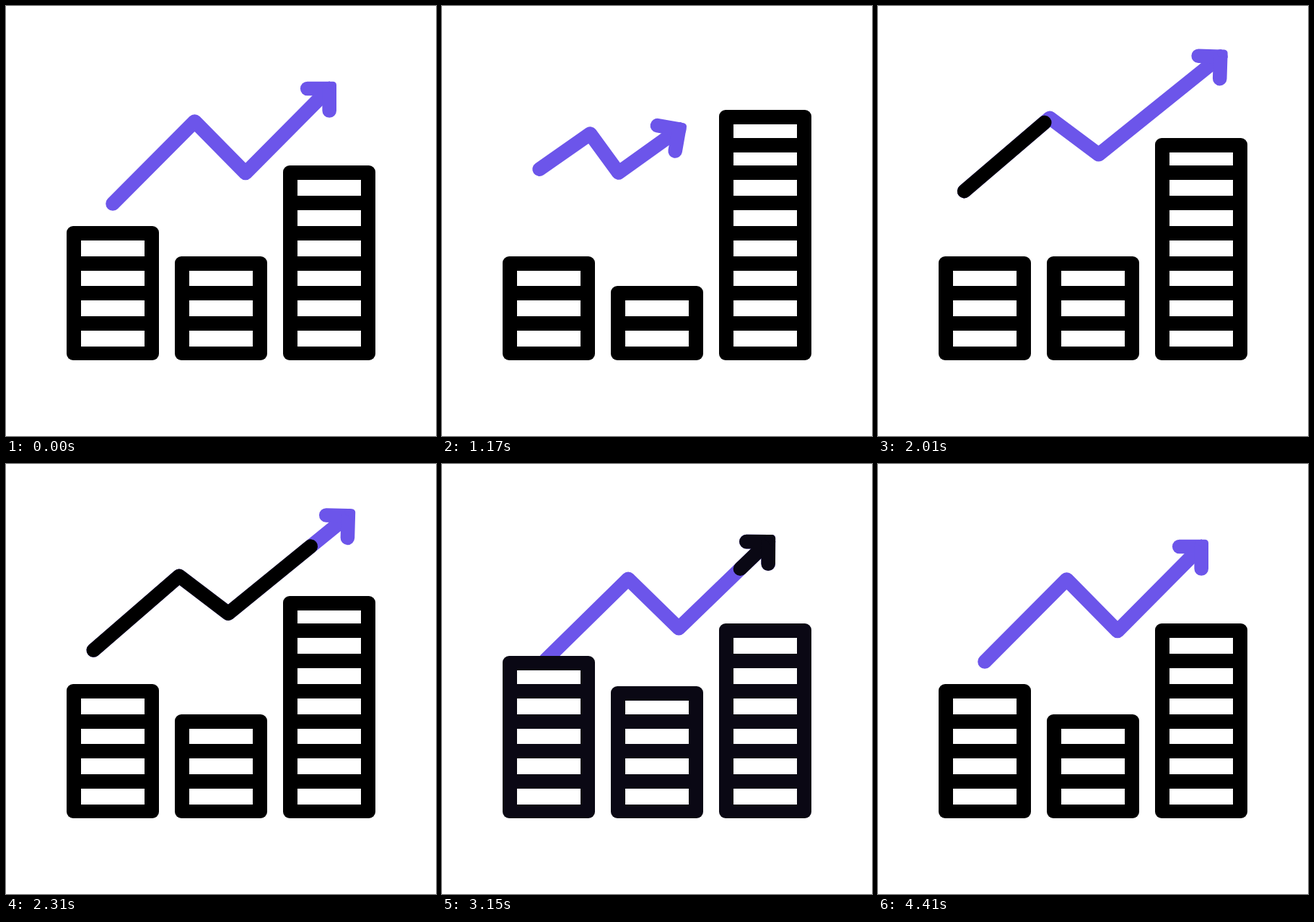
Recreate the animation shown at these times as an HTML page with a canvas. Size 596 by 596 pixels, loop 4.53 s.

```html
<!DOCTYPE html>
<html lang="en">
<head>
<meta charset="utf-8">
<title>Growth chart</title>
<style>
  html, body { margin: 0; width: 100%; height: 100%; overflow: hidden; background: #fff; }
  canvas { display: block; width: 100vw; height: 100vh; }
</style>
</head>
<body>
<canvas id="stage" width="596" height="596"></canvas>
<script>
const ctx = document.getElementById('stage').getContext('2d');
const LOOP = 4530, TICK = 30;
const PURPLE = '#6c55ea', BLACK = '#000', INK = '#0a0814';
const LINE = 19.6, BARB = 30.5;
const BAR_WIDTH = 128, BAND = 20, BOTTOM = 491;

// Arrow poses: start, peak, dip and tip of the line, tilt of the head in radians
const REST = { line: [[148, 274], [261.5, 160], [332, 231.5], [448.2, 114.5]], tilt: 0 };
const LOW = { line: [[136, 225], [204, 178], [242, 232], [322, 175]], tilt: 0.18 };
const HIGH = { line: [[119.5, 257], [238.5, 155], [306.5, 205.5], [476, 69]], tilt: 0.03 };
const MOVES = [
  { from: REST, to: LOW, start: 360, end: 1040, stretch: 0 },
  { from: LOW, to: HIGH, start: 1040, end: 2080, stretch: 0.04 },
  { from: HIGH, to: REST, start: 2080, end: 3510, stretch: 0 }
];

// Rows at rest, and the times at which a row is added or taken away
const BARS = [
  { x: 84, home: 4, added: [1800, 2160, 2700], removed: [690, 1410, 3810] },
  { x: 234, home: 3, added: [1980, 2640, 3330], removed: [750, 3960, 3960] },
  { x: 384, home: 6, added: [600, 960], removed: [1410, 2460] }
];
const HOP = { start: 3930, end: 4410, rise: 18, grow: 1.07 };

const clamp = v => Math.min(1, Math.max(0, v));
const span = (t, a, b) => clamp((t - a) / (b - a));
const ease = p => 0.5 - 0.5 * Math.cos(Math.PI * p);
const mix = (a, b, p) => a + (b - a) * p;
const distance = (a, b) => Math.hypot(b[0] - a[0], b[1] - a[1]);

function arrowPose(t) {
  const { from, to, start, end, stretch } = MOVES.find(m => t < m.end) || MOVES[2];
  const p = ease(span(t, start, end));
  const widen = stretch * Math.sin(Math.PI * p);
  const line = from.line.map(([x, y], i) => {
    const px = mix(x, to.line[i][0], p);
    return [px + widen * (px - 200), mix(y, to.line[i][1], p)];
  });
  return { line, tilt: mix(from.tilt, to.tilt, p) };
}

function stroke(points, width, color, from = 0, to = Infinity) {
  if (to <= from) return;
  ctx.beginPath();
  points.forEach(p => ctx.lineTo(...p));
  ctx.setLineDash(to < Infinity ? [to - from, 9999] : []);
  ctx.lineDashOffset = -from;
  ctx.lineWidth = width;
  ctx.strokeStyle = color;
  ctx.stroke();
  ctx.setLineDash([]);
}

function drawHead(tip, tilt, color, from = 0, to = BARB) {
  ctx.save();
  ctx.translate(...tip);
  ctx.rotate(tilt);
  stroke([[0, 0], [-BARB, 0]], LINE, color, from, to);
  stroke([[0, 0], [0, BARB]], LINE, color, from, to);
  // Squarer outer corner
  if (from === 0) stroke([[0, -5], [5, -5], [5, 0]], LINE - 10, color);
  ctx.restore();
}

// A black run travels along the purple line: its front first, then its end
function drawArrow(t, ink) {
  const { line, tilt } = arrowPose(t);
  const tip = line[3];
  stroke(line, LINE, PURPLE);
  drawHead(tip, tilt, PURPLE);

  const length = line.slice(1).reduce((sum, p, i) => sum + distance(line[i], p), 0);
  const to = span(t, 1830, 2430) * (length + BARB);
  const from = span(t, 2660, 3260) * (length + BARB);
  if (to <= from) return;
  stroke(line, LINE, ink, Math.min(from, length), Math.min(to, length));
  if (to > length) drawHead(tip, tilt, ink, Math.max(0, from - length), to - length);
}

// Rows beyond the resting height sit a little closer together
const bandTop = (row, home) =>
  Math.round(472 - 41.8 * Math.min(row, home) - 38.5 * Math.max(0, row - home));

function drawStack({ x, home }, first, last, ink) {
  const top = bandTop(last, home);
  const bottom = first ? bandTop(first, home) + BAND : BOTTOM;
  ctx.fillStyle = ink;
  ctx.beginPath();
  ctx.roundRect(x, top, BAR_WIDTH, bottom - top, 9);
  ctx.fill();
  ctx.fillStyle = '#fff';
  for (let row = first + 1; row <= last; row++) {
    const y = bandTop(row, home) + BAND;
    ctx.fillRect(x + BAND, y, BAR_WIDTH - 2 * BAND, bandTop(row - 1, home) - y);
  }
}

// The two upper rows of the middle stack hop up and vanish
function drawHop(t, bar, ink) {
  const p = span(t, HOP.start, HOP.end);
  if (p === 0 || p === 1) return;
  const rise = ease(span(p, 0, 0.35));
  const scale = mix(1, HOP.grow, rise) * (1 - ease(span(p, 0.35, 1)));
  const first = bar.home, last = first + 2;
  const cx = bar.x + BAR_WIDTH / 2;
  const cy = (bandTop(first, bar.home) + bandTop(last, bar.home) + BAND) / 2;
  ctx.save();
  ctx.translate(cx, cy - HOP.rise * rise);
  ctx.scale(scale, scale);
  ctx.translate(-cx, -cy);
  drawStack(bar, first, last, ink);
  ctx.restore();
}

function draw(t) {
  const ink = t >= 3060 && t < 3300 ? INK : BLACK;
  const past = times => times.filter(time => time <= t).length;
  ctx.fillStyle = '#fff';
  ctx.fillRect(0, 0, 596, 596);
  ctx.lineCap = ctx.lineJoin = 'round';
  drawArrow(t, ink);
  for (const bar of BARS) {
    drawStack(bar, 0, bar.home + past(bar.added) - past(bar.removed), ink);
  }
  if (t >= BARS[1].removed[1]) drawHop(t, BARS[1], ink);
}

const origin = performance.now();
function tick() {
  const t = (performance.now() - origin) % LOOP;
  draw(Math.floor(t / TICK) * TICK);
  requestAnimationFrame(tick);
}
tick();
</script>
</body>
</html>
```
